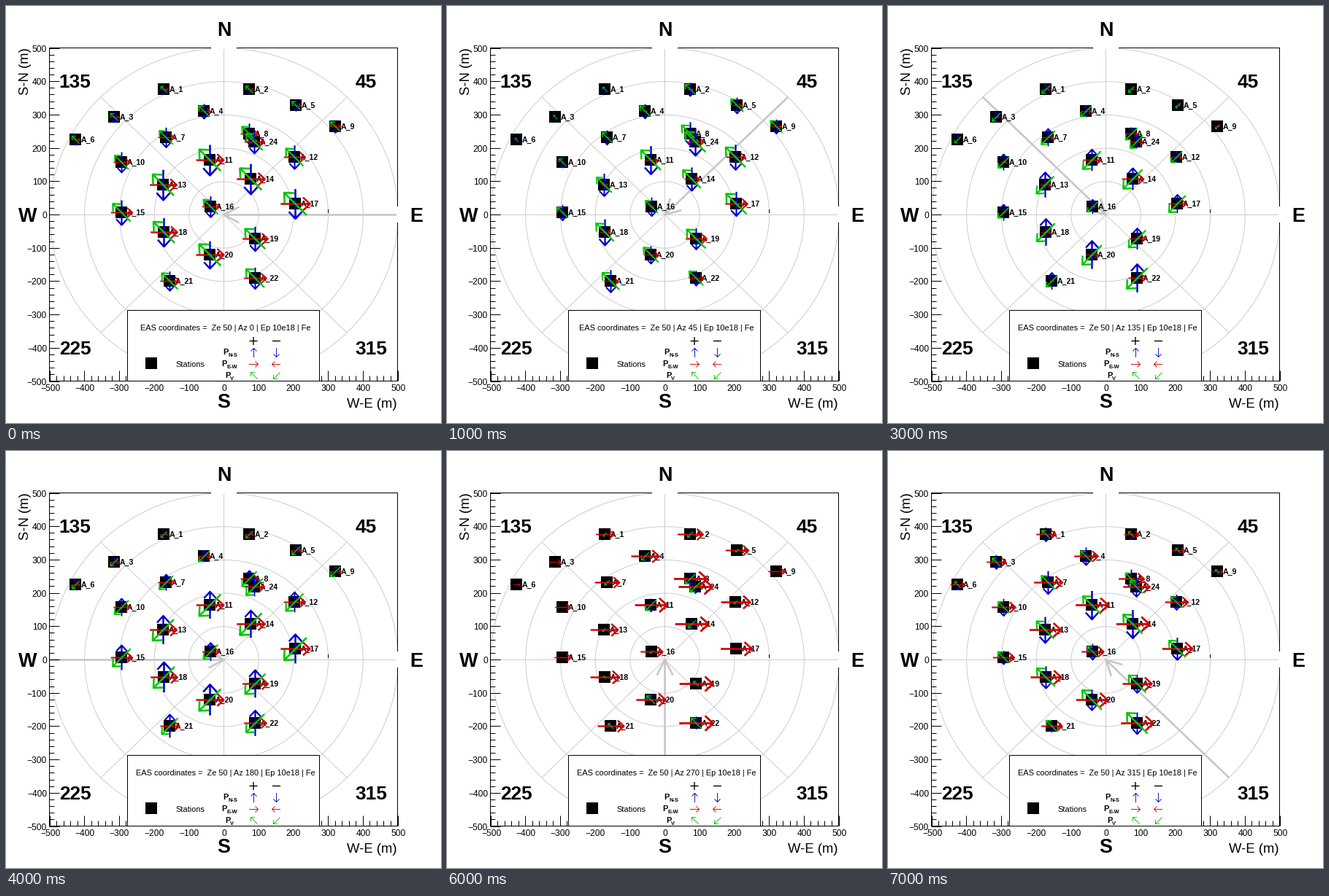
These frames come from a looping animation (596 px wide and 572 px high, 8000 ms). A matplotlib script:

```python
import numpy as np
import matplotlib.pyplot as plt
from matplotlib.animation import FuncAnimation
from matplotlib.patches import Ellipse, Rectangle

W, H, DPI = 596, 572, 100
CX, CY = 298.5, 286.5          # shower core on the stage
SX, SY = 0.477, 0.457          # pixels per metre
LEFT, RIGHT, TOP, BOTTOM = 59.5, 536.5, 57.5, 514.5
GREY = "#c8c8c8"
BLUE, RED, GREEN = "#0000c8", "#d00000", "#00c800"

STATIONS = {
    1: (216, 114), 2: (333, 114), 3: (148, 152), 4: (271, 144),
    5: (397, 136), 6: (95, 183), 7: (219, 180), 8: (333, 175),
    9: (451, 165), 10: (158, 214), 11: (279, 211), 12: (395, 207),
    13: (215, 245), 14: (335, 237), 15: (158, 283), 16: (280, 275),
    17: (396, 271), 18: (216, 310), 19: (341, 319), 20: (279, 341),
    21: (224, 377), 22: (341, 373), 24: (340, 186),
}

ZENITH = np.radians(50)
# field strength against distance from the shower axis (m)
DIST = [0, 40, 90, 125, 165, 185, 200, 250, 300, 355, 400, 450]
GAIN = [1.2, 1.4, 2.2, 3.1, 3.0, 2.1, 1.85, 1.25, 0.88, 0.55, 0.4, 0.3]
MAX_LEN = 48

plt.rcParams["font.family"] = "Liberation Sans"
plt.rcParams["path.snap"] = False
fig = plt.figure(figsize=(W / DPI, H / DPI), dpi=DPI, facecolor="white")
ax = fig.add_axes([0, 0, 1, 1])
ax.set_xlim(0, W)
ax.set_ylim(H, 0)
ax.axis("off")


def pt(px):
    return px * 72 / DPI


def line(xs, ys, color="black", width=1.0, z=1):
    return ax.plot(xs, ys, color=color, lw=pt(width), zorder=z,
                   solid_capstyle="butt", solid_joinstyle="round")[0]


def label(x, mid, s, size, z=7, ha="center", **kw):
    """Text whose capitals are centred on the height mid."""
    return ax.text(x, mid + 0.36 * size, s, fontsize=pt(size), ha=ha,
                   va="baseline", zorder=z, **kw)


def box(x, y, w, h, color, z, edge="none"):
    ax.add_patch(Rectangle((x, y), w, h, fc=color, ec=edge,
                           lw=0 if edge == "none" else pt(1), zorder=z))


def arrow_path(tail, tip, back, half):
    """Shaft and open head as one broken polyline."""
    tail, tip = np.array(tail, float), np.array(tip, float)
    d = tip - tail
    d = d / max(np.hypot(*d), 1e-9)
    n = np.array([-d[1], d[0]])
    base = tip - back * d
    pts = np.array([tail, tip, (np.nan, np.nan),
                    base + half * n, tip, base - half * n])
    return pts[:, 0], pts[:, 1]


def draw_grid():
    for r in range(100, 501, 100):
        ax.add_patch(Ellipse((CX, CY), 2 * r * SX, 2 * r * SY, fill=False,
                             ec=GREY, lw=pt(0.9), zorder=0))
    for a in np.radians(np.arange(0, 360, 45)):
        line([CX, CX + 500 * SX * np.cos(a)],
             [CY, CY - 500 * SY * np.sin(a)], GREY, 0.9, 0)


def draw_axes():
    line([LEFT, RIGHT, RIGHT, LEFT, LEFT],
         [TOP, TOP, BOTTOM, BOTTOM, TOP], z=2)
    for m in range(-500, 501, 20):
        x = np.floor(CX + m * SX) + 0.5
        y = np.floor(CY - m * SY) + 0.5
        size = 14 if m % 100 == 0 else 7
        line([x, x], [BOTTOM, BOTTOM - size], z=2)
        line([LEFT, LEFT + size], [y, y], z=2)
        if m % 100 == 0:
            s = str(m).replace("-", "\u2212")
            label(x, 523.5, s, 12)
            label(56, y, s, 12, ha="right")
    line([441.5, 441.5], [279, 284], z=2)
    # the compass letters sit on white plates that cut the frame
    box(281, 18, 35, 41, "white", 3)
    box(535, 275, 45, 22, "white", 3)
    for x, y, s in ((299, 31.5, "N"), (298, 541, "S"),
                    (30, 286, "W"), (562, 286, "E")):
        label(x, y, s, 27, weight="bold")
    for x, y, s in ((94.5, 103, "135"), (493, 103, "45"),
                    (94.5, 469, "225"), (500, 469, "315")):
        label(x, y, s, 26.3, weight="bold")
    label(536, 544, "W-E (m)", 18.5, ha="right")
    ax.text(18, 57, "S-N (m)", fontsize=pt(18.5), ha="right", va="top",
            rotation=90, rotation_mode="anchor", zorder=7)


def draw_legend():
    box(166.5, 417.5, 263, 97, "white", 3, "black")
    box(191, 482, 16, 16, "black", 4)
    label(252, 491.5, "Stations", 11)
    line([333.5, 344.5], [459.5, 459.5], width=1.4, z=4)
    line([339, 339], [454, 465], width=1.4, z=4)
    line([365, 376], [459.5, 459.5], width=1.4, z=4)
    for x, y, sub in ((297, 474.5, "N-S"), (295, 490.5, "E-W"),
                      (300, 506, "V")):
        label(x, y, "P", 11, ha="left", weight="bold")
        label(x + 7.3, y + 4, sub, 7.5, ha="left", weight="bold")
    for tail, tip, color in (
            ((339.5, 482), (339.5, 469.5), BLUE),
            ((370.5, 469), (370.5, 481.5), BLUE),
            ((333, 491.5), (345.5, 491.5), RED),
            ((376, 491.5), (364.5, 491.5), RED),
            ((344.5, 511.5), (335.5, 502.5), GREEN),
            ((375.5, 502.5), (366.5, 511.5), GREEN)):
        line(*arrow_path(tail, tip, 4, 4), color, 0.9, 4)


def fields(x, y, az):
    """North, east and vertical signal at a station, x and y in metres."""
    s, c = np.sin(ZENITH), np.cos(ZENITH)
    ca, sa = np.cos(az), np.sin(az)
    along = x * ca + y * sa
    rad = np.array([x - along * s * s * ca, y - along * s * s * sa,
                    -along * s * c])
    d = np.hypot(along * c, y * ca - x * sa)
    excess = (0.1 + 0.18 * sa ** 4) / d
    east = 0.53 - 0.44 * sa + excess * rad[0]
    north = -0.6 * ca - excess * rad[1]
    up = 0.7 * ca - excess * rad[2]
    q = np.interp(d, DIST, GAIN) * np.array([north, east, up])
    return np.sign(q) * MAX_LEN * (1 - np.exp(-np.abs(q)))


draw_grid()
draw_axes()
draw_legend()
title = label(300.5, 441, "", 11)
beam = line([], [], GREY, 2.7, 1.5)

DIRS = np.array([(0, -1), (1, 0), (-0.707, -0.707)])
NEG_V = np.array([-0.707, 0.707])
arrows = {}
for k, (x, y) in STATIONS.items():
    box(x - 8, y - 8, 16, 16, "black", 4)
    label(x + 7.5, y, f"A_{k}", 10.5, ha="left", weight="bold", z=5)
    arrows[k] = [line([], [], c, 2, 6) for c in (BLUE, RED, GREEN)]


def update(i):
    deg = 45 * i
    az = np.radians(deg)
    title.set_text(f"EAS coordinates =  Ze 50 | Az {deg} | Ep 10e18 | Fe")
    start = CX + 500 * SX * np.cos(az), CY - 500 * SY * np.sin(az)
    beam.set_data(*arrow_path(start, (CX, CY), 21, 11))
    for k, (px, py) in STATIONS.items():
        pos = np.array([px + 0.5, py + 0.5])
        lens = fields((px + 0.5 - CX) / SX, (CY - py - 0.5) / SY, az)
        for j, (art, size) in enumerate(zip(arrows[k], lens)):
            way = NEG_V if j == 2 and size < 0 else DIRS[j] * np.sign(size)
            size = abs(size)
            step = way * size / 2
            art.set_data(*arrow_path(pos - step, pos + step,
                                     0.24 * size, 0.22 * size))
            art.set_linewidth(pt(0.6 + size / 21))
            art.set_visible(size > 3)
    return []


anim = FuncAnimation(fig, update, frames=8, init_func=lambda: update(0),
                     interval=1000, repeat=True, repeat_delay=0, blit=False)
plt.show()
```
